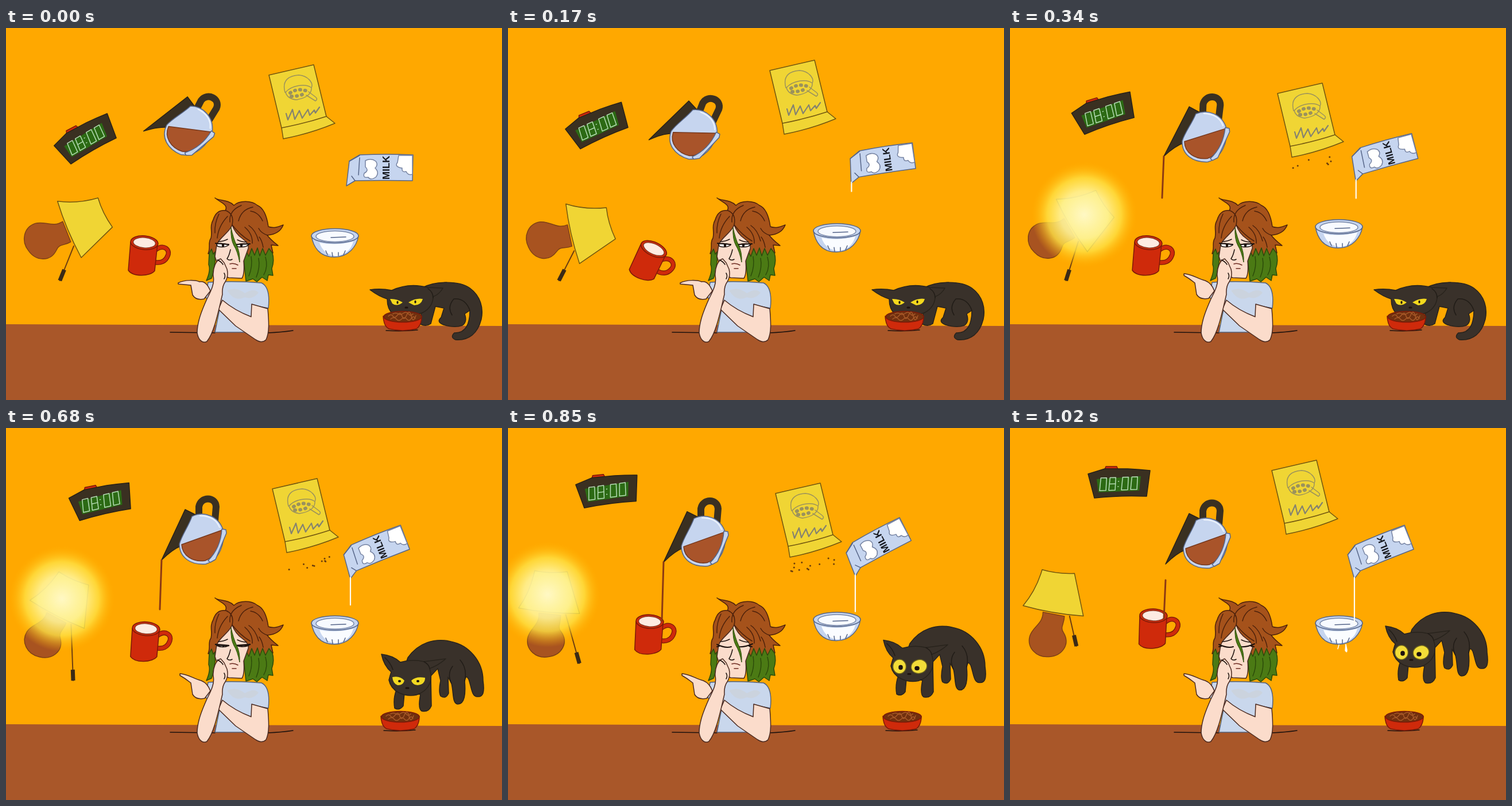
Animation, 864 px wide and 648 px high, one loop 1190 ms. Source, as an HTML page:

```html
<!DOCTYPE html>
<html lang="en">
<head>
<meta charset="utf-8">
<title>Breakfast in mid-air</title>
<style>
  html, body { margin: 0; width: 100%; height: 100%; overflow: hidden; background: #ffa800; }
  svg { display: block; width: 100vw; height: 100vh; stroke-width: 1.5; stroke-linejoin: round; stroke-linecap: round; }
  text { font: bold 17px "Liberation Sans", sans-serif; }
  .skin { fill: #fbdccb; stroke: #4b2a20; }
  .hair { fill: #a5521b; stroke: #4d210b; }
  .green { fill: #4b7a14; stroke: #2c4b0a; }
  .glass { fill: #c6d5ef; stroke: #566588; }
  .dark { fill: #3a3021; stroke: #2a2217; }
  .cat { fill: #39312a; stroke: #28231c; }
  .bag { fill: #f0d534; stroke: #71560f; }
  .grey { stroke: #9b925c; }
  .red { fill: #cf2a0b; stroke: #7c1a08; }
  .wood { fill: #a85320; stroke: #7f4114; }
  .ink { stroke: #1d120e; }
  .none, .ink, .grey { fill: none; }
</style>
</head>
<body>
<svg viewBox="0 0 864 648" preserveAspectRatio="none">
  <defs>
    <radialGradient id="shine">
      <stop offset="0" stop-color="#fff8c4"/>
      <stop offset=".45" stop-color="#fff293" stop-opacity=".92"/>
      <stop offset=".7" stop-color="#ffe244" stop-opacity=".8"/>
      <stop offset="1" stop-color="#ffb400" stop-opacity="0"/>
    </radialGradient>
    <path id="zero" d="M3 0H13L11 22H0Z"/>
  </defs>

  <rect width="864" height="648" fill="#ffa800"/>
  <path fill="#a95729" d="M0 516L864 519V648H0Z"/>
  <path class="ink" d="M286 530L364 531M456 531Q480 530 500 527"/>

  <g id="clock">
    <path class="red" d="M-25 -5L-23 -10H-4L-2 -5Z"/>
    <path class="dark" d="M-54 3Q-38 -2 -25 -6H15Q35 -5 54 -3L48 42Q2 40 -43 45Z"/>
    <path fill="#2c6a14" d="M-39 12L38 7 35 32 -36 35Z"/>
    <g fill="none" stroke="#b5dcb4" transform="rotate(-2)">
      <use href="#zero" x="-35" y="9"/><use href="#zero" x="-19" y="9"/>
      <use href="#zero" x="3" y="9"/><use href="#zero" x="19" y="9"/>
      <path d="M-17 20H-7M-2 16h1M-3 25h1"/>
    </g>
  </g>

  <g id="pot">
    <path class="none" stroke="#3a3021" stroke-width="12" stroke-linecap="butt" d="M-4 -38L-4 -56C-1 -74 25 -74 26 -56L24 -32"/>
    <path class="dark" d="M-69 37Q-48 -8 -28 -51L-10 -42 -20 -20 -34 12Q-50 18 -69 37Z"/>
    <path class="glass" d="M-16 -39C4 -49 30 -40 38 -16C42 8 32 36 8 44C-18 46 -38 33 -38 9C-34 -6 -22 -22 -16 -39Z"/>
    <path fill="#a9542a" stroke="#76381d" d="M-34 10L36 -15C37 6 28 30 7 38C-14 41 -33 30 -34 10Z"/>
    <path class="glass" d="M36 -17L43 -16 44 -10 25 36 16 41 12 38Q34 16 36 -17Z"/>
    <path class="none" stroke="#edf3fb" stroke-width="2" d="M-2 -40Q24 -40 32 -20"/>
  </g>

  <g id="bag">
    <path class="bag" d="M458 82L536 64 558 154 573 166Q530 184 483 193L480 174Z"/>
    <path class="bag none" d="M480 174Q522 166 558 154"/>
    <path class="grey" d="M486 112C480 90 494 83 510 82C526 83 536 96 532 104M487 112C497 100 521 96 532 104C533 116 520 123 505 125Q490 123 487 112ZM523 117L539 127Q544 124 539 120L527 111"/>
    <path class="grey" stroke-width="6" stroke-dasharray="1 8" d="M495 113Q508 104 525 110M497 119Q510 119 518 115"/>
    <path class="none" stroke="#85836f" stroke-width="2.2" d="M488 149L491 160 499 142 503 159 511 144 516 157 526 142 529 152 537 143 539 148 546 138"/>
  </g>
  <path id="crumbs" class="none" stroke="#6b3d0c" stroke-width="3"/>

  <g id="milk">
    <path class="glass" d="M-35 -27Q12 -29 58 -27L57 18Q8 17 -43 18L-58 27 -53 -16Z"/>
    <path class="glass none" d="M-53 -16L-35 -26M-43 18L-49 10M-35 -22L-37 8"/>
    <g fill="#fff" stroke="#7683a2">
      <path d="M-25 -17Q-15 -22 -7 -16Q-2 -10 -8 -4Q0 4 -7 12Q-16 18 -20 12Q-30 14 -27 5Q-18 0 -25 -6Z"/>
      <path d="M33 -26H57V7Q49 9 46 2Q38 4 39 -4Q25 -6 31 -14Z"/>
    </g>
    <text transform="translate(16.5 16) rotate(-90)" fill="#17191f">MILK</text>
  </g>

  <g id="bowl">
    <path class="glass" d="M-41 0C-38 18 -28 37 -1 37C24 37 38 18 41 0Z"/>
    <path fill="#fafcff" d="M-27 12Q0 18 32 10Q26 32 2 35Q-20 33 -27 12Z"/>
    <ellipse class="glass" rx="41" ry="12.5"/>
    <ellipse cy="1" rx="33" ry="9.5" fill="#f7faff" stroke="#7887a8"/>
    <path class="glass none" d="M-7 3L19 2M-16 26l3 7M-5 29l1 7M6 29v6M18 26l-3 7"/>
    <path data-on="5" fill="#fffdf5" stroke="#fffdf5" d="M0 38l-2 7M12 37l-1 11q3 5 3 -1z"/>
  </g>
  <path id="pour" class="none" stroke="#fffdf5" stroke-width="2.2"/>

  <g id="mug">
    <path class="none" stroke="#7c1a08" stroke-width="8.5" d="M20 12C34 2 45 12 41 22C37 33 28 36 18 34"/>
    <path class="none" stroke="#cf2a0b" stroke-width="6" d="M20 12C34 2 45 12 41 22C37 33 28 36 18 34"/>
    <path class="red" d="M-24 -1L-28 48C-20 60 10 59 18 49L23 2Z"/>
    <ellipse class="red" rx="24" ry="12" transform="rotate(5)"/>
    <ellipse rx="19.5" ry="9" fill="#fdebe2" stroke="#8d3a26" transform="rotate(5)"/>
  </g>
  <path id="coffee" class="none" stroke="#8c3a13" stroke-width="3"/>

  <path id="cord" class="none" stroke="#6d3e10" stroke-width="2"/>
  <path id="weight" class="none" stroke="#3b2a16" stroke-width="7" stroke-linecap="butt"/>
  <g id="lamp">
    <path class="wood" d="M-6 -45L31 -36C30 -22 22 -18 28 -8C40 14 23 33 1 33C-21 34 -37 16 -31 -4C-25 -21 -7 -24 -6 -45Z"/>
    <path class="bag" d="M-4 -119Q22 -110 52 -110L64 -35Q8 -42 -40 -58Q-16 -84 -4 -119Z"/>
    <circle data-on="2 3 4" cx="13" cy="-75" r="92" fill="url(#shine)"/>
  </g>

  <g id="woman">
    <path class="hair" d="M364 296C372 302 386 298 397 309C406 300 428 300 438 309C450 314 455 332 457 346C468 350 477 345 483 343C478 356 467 360 455 361C462 370 469 375 474 379L462 378 465 392 420 402 352 393C357 382 351 374 357 366C360 354 354 346 361 334C365 321 372 317 382 318C388 308 374 304 364 296Z"/>
    <path class="green" d="M354 392L358 385 361 394 364 390 364 408Q362 424 358 436L349 440Q357 422 353 412Z"/>
    <path class="green" d="M414 402L419 390 423 398 428 384 433 396 438 383 442 397 447 384 452 396 458 384 464 392Q468 405 463 419L465 431 457 430 455 440 446 434 437 442 430 437 418 441Z"/>
    <path class="green none" d="M427 398Q430 415 423 432M440 401Q443 417 436 434M452 399Q457 416 449 430"/>
    <path fill="#c9d7ec" stroke="#546078" d="M352 443Q400 440 445 444C458 450 459 470 457 488L430 483 426 530 364 530 374 480 348 470Z"/>
    <path fill="#cdd0d6" opacity=".6" d="M385 457Q402 450 416 462Q432 452 440 461Q430 474 416 469Q398 478 385 457Z"/>
    <path class="skin" d="M394 343C388 358 372 364 367 378L364 398 373 428 388 435 411 436Q416 428 414 406L422 384Q424 376 412 367Q399 358 394 343Z"/>
    <path class="hair none" d="M394 343Q398 324 383 318M394 343Q408 361 425 371M410 309Q388 318 390 338M430 312Q410 316 405 336M447 336Q440 321 426 319M440 371Q435 352 423 344M456 361Q445 358 440 349M371 324Q363 340 364 357M386 328Q370 345 368 366M448 382Q446 370 441 364M429 375Q430 359 416 347"/>
    <path class="ink" d="M391 386Q389 396 385 402Q389 406 394 403M370 372Q378 372 386 368M403 369Q411 373 419 373"/>
    <path class="none" stroke="#6c2a20" d="M390 411Q397 409 404 413M394 419h7"/>
    <g data-on="0 1 2">
      <path fill="#fff" stroke="#1b100c" d="M367 376Q378 374 388 378Q379 384 368 380ZM401 378Q411 374 423 377Q418 383 404 381Z"/>
      <path class="ink" stroke-width="4.5" d="M378 378v1M410 378v1"/>
      <path class="ink" stroke-width="2.2" d="M365 375L388 377M400 377L425 376"/>
    </g>
    <g data-on="3">
      <path fill="#fff" stroke="#1b100c" d="M367 379H388Q378 384 367 379ZM401 379H423Q412 383 401 379Z"/>
      <path class="ink" stroke-width="2.4" d="M365 377L388 379M400 379L425 377M378 380h1M410 380h1"/>
    </g>
    <path data-on="4 5" class="ink" stroke-width="2" d="M364 377Q378 384 389 381M401 381Q413 382 426 376M368 380l-4 1M420 380l5 1"/>
    <path class="green" stroke-width="1" d="M392 348Q391 368 397 379Q403 388 407 408Q408 390 401 377Q396 366 392 348Z"/>
    <path class="skin" d="M428 481L456 489C458 512 459 530 453 543Q446 550 435 543L400 519 370 490 377 474Q398 492 427 503Z"/>
    <path data-on="0 1" class="skin" d="M300 444C312 438 330 439 337 442C346 440 352 448 356 458L345 472Q331 475 325 465L322 448Q312 447 300 446Z"/>
    <path data-on="2 3 4 5" class="skin" d="M303 428C315 428 328 437 340 440C350 444 354 452 356 458L346 471Q331 474 325 464L322 444Q312 436 303 431Z"/>
    <path class="skin" d="M374 402C366 404 360 418 361 432C364 446 356 460 350 472C341 492 333 512 333 531C335 544 343 550 350 546C363 530 370 493 377 464Q376 450 382 442Q388 432 385 420L380 409Z"/>
    <path class="ink" d="M380 427Q383 432 380 437M368 404Q374 406 378 412"/>
  </g>

  <g data-on="0 1 2">
    <path class="cat" d="M726 452C748 440 790 440 808 453C827 467 832 488 828 507C822 532 806 545 783 543Q773 539 781 531C801 532 808 515 808 492L799 498Q804 512 795 518Q782 523 762 517Q749 512 758 504L763 488 748 485 740 515Q732 521 722 516Z"/>
    <path class="cat" d="M634 456Q652 453 672 457Q702 443 735 452L761 453Q755 464 744 468C744 482 734 494 720 498H674Q664 490 664 472Q650 468 634 456Z"/>
    <path class="none" stroke="#211c17" d="M808 492Q800 470 780 472Q768 486 777 500M735 454Q744 460 744 470"/>
    <path fill="#f4d91d" d="M669 472Q680 471 691 478Q681 486 673 480ZM701 478Q714 470 726 472Q723 483 711 483Z"/>
    <path class="ink" stroke-width="3" d="M682 477v2M713 476v2M696 487h3"/>
  </g>

  <g id="leap" data-on="3 4 5">
    <path class="cat" d="M700 400C718 374 747 365 775 372C806 378 831 406 831 440C834 461 831 469 821 468C811 468 811 452 806 438Q801 428 799 441C801 463 799 481 787 481C777 480 780 461 776 445L770 434 771 462Q766 473 757 467Q753 459 757 440L752 419 740 432 741 484Q736 496 724 493Q717 489 722 464L694 462 692 484Q685 493 677 488Q674 472 680 456Z"/>
    <path class="cat" d="M654 394Q674 396 687 408Q708 402 728 407L766 402Q754 413 738 419C745 440 736 458 715 465C693 469 671 459 667 439Q669 431 671 425Q658 414 654 394Z"/>
    <path class="none" stroke="#211c17" d="M728 407Q737 412 738 419M776 445Q768 428 778 415M799 441Q804 419 791 404M660 400Q670 409 674 421"/>
    <g data-on="3">
      <path fill="#f2d821" d="M673 434Q686 431 694 440Q691 449 682 448Q674 445 673 434ZM706 440Q714 432 730 435Q730 447 717 448Q708 447 706 440Z"/>
      <path class="ink" stroke-width="4" d="M685 441h1M717 441h1"/>
    </g>
    <g data-on="4 5">
      <g fill="#f2dc38" stroke="#685e1e"><ellipse cx="682" cy="440" rx="11.5" ry="12.5"/><ellipse cx="716" cy="440" rx="14" ry="12" transform="rotate(-15 716 440)"/></g>
      <path class="ink" stroke-width="7.5" d="M684 441v1M712 443h1"/>
    </g>
    <path class="ink" stroke-width="3" d="M697 453h4"/>
  </g>

  <g id="dish">
    <path class="ink" d="M-29 17Q0 19 26 16"/>
    <path class="red" d="M-34 -8Q-33 10 -24 14Q0 20 24 14Q33 8 33 -8Z"/>
    <ellipse cy="-7" rx="33" ry="9.5" fill="#71300f" stroke="#7c1a08"/>
    <path class="none" stroke="#a85928" d="M-25 -8q5-5 8 0t8-2 8 2 8-2 8 2 8-1M-21 -3q6-5 10 0t9 0 9 0 8-1 7 0M-17 -12q5-3 9 0t9-1 9 1 8 0"/>
  </g>
</svg>
<script>
const $ = id => document.getElementById(id);
const { sin, cos, max, min, abs, PI } = Math;
const beat = 170, steps = [0, 1, 2, 2, 3, 4, 5];

function place(id, x, y, turn = 0) {
  $(id).setAttribute("transform", `translate(${x} ${y}) rotate(${turn})`);
  const c = cos(turn * PI / 180), s = sin(turn * PI / 180);
  return (px, py) => [x + px * c - py * s, y + px * s + py * c];
}

const line = (id, x, y, u, v) => $(id).setAttribute("d", v > y ? `M${x} ${y}L${u} ${v}` : "");

function random(seed) {
  return () => (seed = seed * 16807 % 2147483647) / 2147483647;
}

function drawCrumbs(count, seed) {
  const rnd = random(seed);
  let d = "";
  for (let n = 0; n < count; n++) {
    const x = 92 * rnd();
    d += `M${493 + x} ${236 - x / 4 + 20 * rnd()}h.1`;
  }
  $("crumbs").setAttribute("d", d);
}

function drawLamp(i) {
  const turn = 28 + 37 * cos((i - .85) * .9);
  const [x, y] = place("lamp", 65.5, 368 - i / 2, turn)(40, -36);
  const slope = .2 - .011 * turn, end = 440 - 30 * max(0, i - 3);
  const endX = x + (end - y) * slope;
  line("cord", x, y, endX, end);
  line("weight", endX - 19 * slope, end - 19, endX, end);
}

function show(i) {
  const u = i / 5, odd = i % 2, shaking = i > 1 && i < 5;
  place("clock", 130 + 60 * u + 7 * sin(2 * PI * u), 77 + 100 * (1 - u) ** 1.25, -28 * (1 - u));

  const back = max(0, 1 - (2.4 * u) ** 2);
  const spout = place("pot", 340 - 22 * back, 178 + 22 * u ** .75, 27 * back)(-69, 37);
  const tipped = i === 1, mugY = 374 + 11 * tipped - 47 * max(0, u * 5 / 3 - 2 / 3) ** .6;
  place("mug", 241 + 13 * tipped + 3 * max(0, i - 2), mugY, tipped ? 20 : -max(0, i - 2));
  const from = spout[1] + (i > 4 ? 28 : 0);
  line("coffee", spout[0], from, spout[0] - 3, i > 1 ? min(256 + 20 * i, mugY + 5) : 0);

  place("bag", 8 * shaking - 2 * odd, 32 * shaking - 8 * odd);
  drawCrumbs(shaking ? 3 * i + 1 : 0, 77 + i);

  const lift = (1 - abs(i - 4) / 4) ** .85;
  const [x, y] = place("milk", i > 2 ? 643.5 : 651, 248 - 41 * lift, -28 * lift)(-57, 25);
  line("pour", x, y, x, y + 16 * i);
  place("bowl", 573, 362 - 28.5 * lift);

  drawLamp(i);
  place("leap", 0, -24.5 * (i - 3));
  place("dish", i > 2 ? 687 : 691, 510);

  for (const el of document.querySelectorAll("[data-on]"))
    el.style.display = el.dataset.on.includes(i) ? "" : "none";
}

const start = performance.now();
let last = -1;
function tick() {
  const i = steps[Math.floor((performance.now() - start) / beat) % steps.length];
  if (i !== last) show(last = i);
  requestAnimationFrame(tick);
}
tick();
</script>
</body>
</html>
```
